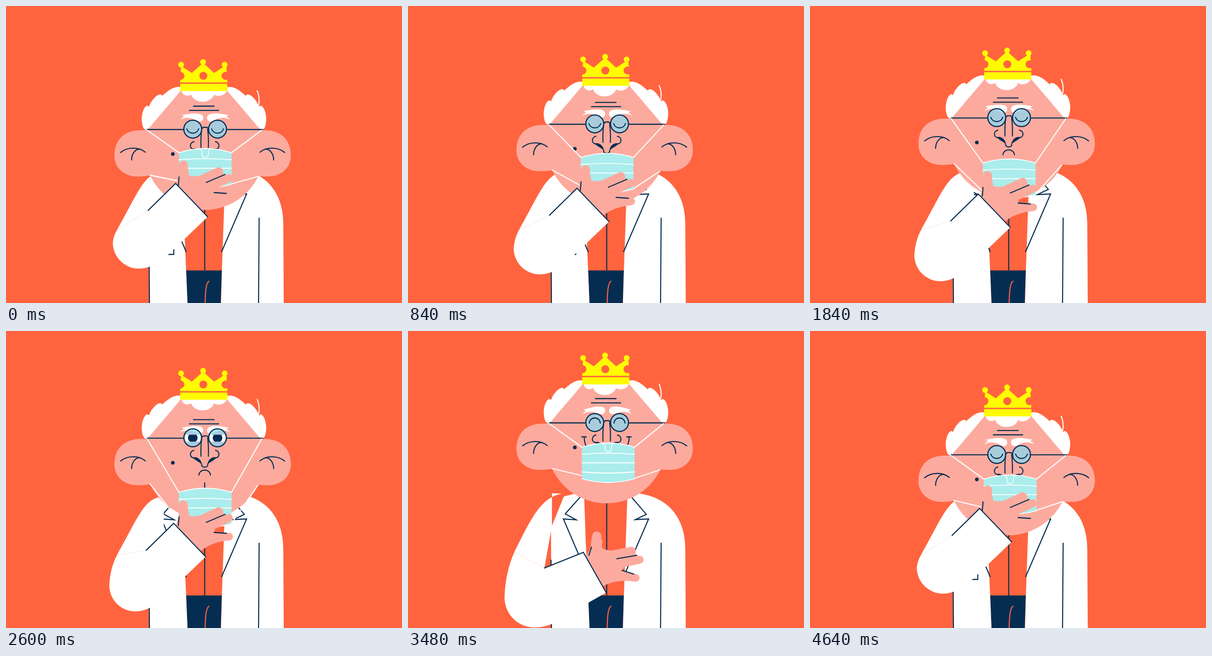
These frames come from a looping animation (864 px wide and 648 px high, 4680 ms). An HTML page with a canvas:

```html
<!DOCTYPE html>
<html lang="en">
<head>
<meta charset="utf-8">
<title>Mask pull</title>
<style>
  html, body { margin: 0; width: 100%; height: 100%; overflow: hidden; background: #ff643f; }
  canvas { display: block; width: 864px; height: 648px; }
</style>
</head>
<body>
<canvas id="stage" width="864" height="648"></canvas>
<script>
const ctx = document.getElementById('stage').getContext('2d');
const LOOP = 4680, STEP = 40;
const BG = '#ff643f', SKIN = '#fdaa9e', NAVY = '#052d52', WHITE = '#fff',
      MASK = '#aaedec', GLASS = 'rgba(133,220,245,.7)', GOLD = '#fffb00';

const lerp = (a, b, u) => a + (b - a) * u;
const polar = ([x, y], r, angle) => [x + r * Math.cos(angle), y + r * Math.sin(angle)];

// Smooth interpolation through [time, value] pairs.
function key(t, ...keys) {
  if (t <= keys[0][0]) return keys[0][1];
  for (let i = 1; i < keys.length; i++) {
    const [t0, v0] = keys[i - 1], [t1, v1] = keys[i];
    if (t < t1) {
      const u = (t - t0) / (t1 - t0);
      return lerp(v0, v1, u * u * (3 - 2 * u));
    }
  }
  return keys[keys.length - 1][1];
}

function fill(path, color) {
  ctx.fillStyle = color;
  ctx.fill(new Path2D(path));
}
function stroke(path, color = NAVY, width = 2.3) {
  ctx.strokeStyle = color;
  ctx.lineWidth = width;
  ctx.stroke(new Path2D(path));
}
function disc(x, y, r, color) {
  ctx.fillStyle = color;
  ctx.beginPath();
  ctx.arc(x, y, r, 0, 7);
  ctx.fill();
}
// Draws with the plane turned around a pivot.
function turned(x, y, angle, draw) {
  ctx.save();
  ctx.translate(x, y);
  ctx.rotate(angle);
  ctx.translate(-x, -y);
  draw();
  ctx.restore();
}
// Draws a left part and its reflection around the given axis.
function mirrored(axis, draw) {
  draw();
  ctx.save();
  ctx.translate(2 * axis, 0);
  ctx.scale(-1, 1);
  draw();
  ctx.restore();
}

// Arm joints from two amounts: how far the mask is pulled, how far the arm has opened.
function armPose(t) {
  const pull = t < 3360 ? t / 3080
    : key(t, [3360, 1.09], [3460, 1.6], [3800, 0], [3960, 0], [4180, .65], [4480, 0]);
  const open = key(t, [3360, 0], [3640, 1.15], [3880, 1], [3960, 1], [4500, 0]);
  const cuff = [405 - 5 * pull + 23 * open, 423.5 + 38.5 * pull + 93.5 * open];
  const tilt = .806 + .553 * open;
  const top = polar(cuff, -50.5, tilt), bottom = polar(cuff, 50.5, tilt);
  return {
    pull, open, cuff, top, bottom,
    elbow: [290 - 9 * pull, 516 + 46 * pull - 16 * open],
    radius: 57 + 18 * open,
    fold: polar(top, 84 + 17 * open, 2.365 + .87 * open),
    under: polar(bottom, 116 - 56 * open, tilt + Math.PI / 2)
  };
}

function drawUpperArm({ pull, open, fold }) {
  const joint = [242 - 22 * open, 489 - 15 * open];
  const lead = [joint[0] + 49 - 27 * open, joint[1] - 87 + 33 * open];
  const inner = lerp(389 - 53 * pull, 325, open);
  fill(`M${340 - 10 * open} ${361 - 13 * open}C${300 - 25 * open} ${368 - 10 * open} ${lead} ${joint}` +
       `L${fold}L${inner} 425V354Z`, WHITE);
}

function drawForearm({ open, elbow: [x, y], radius: r, top, bottom, fold, under }) {
  const joint = [242 - 22 * open, 489 - 15 * open];
  fill(`M${joint}Q${x - r + 1.5} ${lerp(joint[1], y, .45)} ${x - r} ${y}A${r} ${r} 0 0 0 ${x} ${y + r}` +
       `Q${(x + under[0]) / 2} ${y + r} ${under}L${bottom}L${top}L${fold}Z`, WHITE);
  stroke(`M${fold}L${top}L${bottom}`);
}

function drawHand({ pull, open }) {
  ctx.save();
  ctx.translate(23 * open, 38.5 * pull + 93.5 * open);
  turned(405, 423.5, .52 * open, () => {
    turned(387, 386, -.23 * open, () => stroke('M386.500 386L387 347', SKIN, 20));
    stroke('M410 387L464 362', SKIN, 20);
    stroke('M430 402L486 375.500', SKIN, 17.5);
    stroke('M440 418L487 416', SKIN, 16.5);
    fill('M377 372L370 395L405 440L422 450Q448 427 487 424.500L482 409L455 408L456 399' +
         'L480 370L462 354Q420 377 400 370L396 350Z', SKIN);
    stroke('M437 385L478 367.500M454 407L481 409M377.500 373L376 392');
  });
  ctx.restore();
}

function drawBody(pose) {
  stroke('M433.500 360V577');
  fill('M393 577H471L468.500 648H396Z', NAVY);
  stroke('M434.500 650C435 625 436 604 443 600.500', BG);
  fill('M340 361L384 350L388 465L393 577L396 650H313L312 430Z', WHITE);
  fill('M479 350L500 354C570 362 605 410 605 475L606 650H469L471 577Z', WHITE);
  stroke('M312 500L313 650');
  stroke('M376 362L343 399L367 412L339 410L393 536');
  stroke('M489 364L520 400L496 411.500L525 410L470.500 536');
  stroke('M340 542H366V520');
  stroke('M552.300 463L551 650');
  drawUpperArm(pose);
}

function drawEye(x, mood, open) {
  const y = 268.7;
  disc(x, y, 19.5, GLASS);
  if (mood === 'open') {
    ctx.save();
    ctx.beginPath();
    ctx.rect(x - 20, y - 9 * open, 40, 20 * open);
    ctx.clip();
    disc(x, y, 17, WHITE);
    disc(x, y, 10.5, NAVY);
    ctx.restore();
  } else if (mood === 'happy') {
    stroke(`M${x - 12} 270C${x - 11} 255 ${x + 11} 255 ${x + 12} 270`);
  } else {
    stroke(`M${x - 13} 268C${x - 9} 280.500 ${x + 9} 280.500 ${x + 13} 268`);
  }
  ctx.lineWidth = 2.5;
  ctx.beginPath();
  ctx.arc(x, y, 19.5, 0, 7);
  ctx.stroke();
}

function drawMouth(smile) {
  const w = lerp(12.5, 49, smile), y = lerp(350, 300, smile), d = lerp(-11, 49, smile);
  ctx.strokeStyle = NAVY;
  ctx.lineWidth = 2.3;
  ctx.beginPath();
  ctx.ellipse(433.5, y, w, Math.abs(d), 0, 0, Math.PI, d < 0);
  ctx.stroke();
  if (smile > .9) stroke('M379 300H389M477 300H487');
  stroke('M433.500 367V382');
}

function drawFace(t) {
  const frown = t < 2640 ? .004 * t : key(t, [2640, 10.5], [3040, -2]);
  const lift = key(t, [2640, 0], [3040, 1], [4050, 1], [4450, 0]);
  const smile = key(t, [2740, 0], [2960, 1], [4100, 1], [4360, 0]);
  const open = key(t, [2440, 0], [2640, .85], [2880, 1]);
  const mood = t < 2480 || t > 4240 ? 'shut' : t < 3380 ? 'open' : 'happy';

  const fy = 218.5 + frown;
  stroke(`M409 ${fy}H454M400 ${fy + 9.3}H464`);
  disc(364, 323, 4, NAVY);
  drawMouth(smile);

  mirrored(433.5, () => {
    stroke('M427 269Q424.500 290 425.500 309');
    stroke('M410 296C400 298 400 311 409 312.500');
    fill('M407 311.500C416 308.500 427 315 428 329C424 321 415 320 407 311.500Z', NAVY);
  });
  stroke('M427 327C425 334.500 442 334.500 440 327');

  mirrored(434.5, () => turned(425, 244, -.1 * lift, () => {
    ctx.translate(0, frown * .8);
    fill('M383 238C392 237 410 232 424 236C433 238 432 252 423 252C414 251 412 245 396 244' +
         'C389 244 385 246 381 248C382 245 385 243 389 241Q386 240 383 238Z', WHITE);
  }));

  stroke('M308 269.500H388M481 269.500H560');
  stroke('M427 269C428 263 441 263 442 269');
  drawEye(407.5, mood, open);
  drawEye(461.5, mood, open);
}

function drawCrown() {
  fill('M380 166.800L382 131L405.500 146L430 124L454 146L477 131L481 133L483 166.800Z', GOLD);
  fill('M380 169.800H483V185.500H380Z', GOLD);
  for (const [x, y] of [[382, 128], [430, 122.3], [477, 128]]) disc(x, y, 6.3, GOLD);
  for (const x of [380.5, 430.5, 479]) disc(x, 152.3, 8.7, BG);
}

function drawHead(t) {
  mirrored(429, () => {
    fill('M330 271H295C255 271 236.500 295 236.500 326C236.500 354 258 372 287 372C300 372 310 371 330 366Z', SKIN);
  });
  disc(433, 314, 131, SKIN);
  fill('M383 183H482L558 271H308Z', SKIN);
  mirrored(429, () => {
    stroke('M250 319.500C265 307 290 307 304 319M274 336C274 324 281 312 292 312');
  });
  mirrored(432, () => {
    fill('M383 183L381 177C364 173 347 191 341 196C336 186 317 203 312 220' +
         'C305 209 290 238 299 264Q302 271 308 271Z', WHITE);
  });
  fill('M383 184C385 197 398 198 404 193C410 214 448 214 454 193C460 199 478 197 482 184Z', WHITE);
  stroke('M548 185C553 196 553 210 551 217', WHITE);
  drawCrown();
  drawFace(t);
}

function drawMask(t, headY) {
  const held = key(t, [3340, 1], [3420, 0]);
  const l = lerp(379.5, 377.3, held), r = l + 114.7, mid = (l + r) / 2;
  const y = lerp(322.5 + headY, 320 + .0123 * t, held);
  const curve = (dy, bend) => `${l} ${y + dy}Q${mid} ${y + dy + bend} ${r} ${y + dy}`;

  stroke(`M308 ${271 + headY}L${l} ${y}M558 ${271 + headY}L${r} ${y}` +
         `M314 ${369 + headY}L${l} ${y + 62}M549.500 ${372 + headY}L${r} ${y + 68}`, WHITE);
  fill(`M${curve(0, -18)}L${r} ${y + 69}Q${mid} ${y + 85} ${l} ${y + 69}Z`, MASK);
  stroke(`M${curve(0, -18)}M${curve(15.5, -5)}M${curve(34, 0)}M${curve(54, 5)}M${curve(69, 16)}`, WHITE, 1.8);

  // The nose bump only shows while the mask sits on the nose.
  if (y - headY < 327) {
    ctx.save();
    ctx.translate(mid, y);
    const bump = 'M-11 -6C-4 -7 -9 3 -6 7C-3 11 4 11 6 7C9 3 4 -7 11 -6';
    fill(bump, MASK);
    stroke(bump, WHITE, 1.6);
    ctx.restore();
  }
}

function draw(t) {
  const headY = t < 3280 ? -.0137 * t
    : key(t, [3280, -45], [3480, -69], [3880, -45.5], [3960, -45.5], [4520, -.8], [4640, .7]);
  const pose = armPose(t);
  ctx.fillStyle = BG;
  ctx.fillRect(0, 0, 864, 648);
  ctx.lineCap = 'round';
  drawBody(pose);
  ctx.save();
  ctx.translate(0, headY);
  drawHead(t);
  ctx.restore();
  drawMask(t, headY);
  drawHand(pose);
  drawForearm(pose);
}

const start = performance.now();
function tick() {
  const t = (performance.now() - start) % LOOP;
  draw(Math.floor(t / STEP) * STEP);
  requestAnimationFrame(tick);
}
tick();
</script>
</body>
</html>
```
